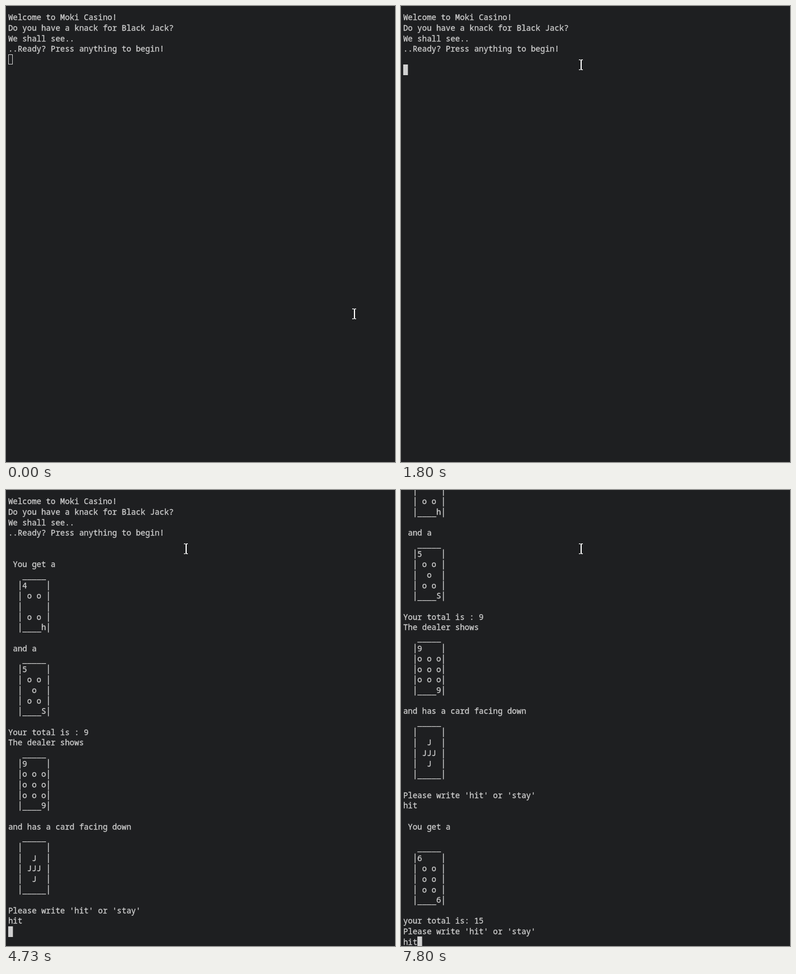
Recreate the animation shown at these times as an HTML page with a canvas. Size 691 px wide and 811 px high, loop 8000 ms.

```html
<!DOCTYPE html>
<html>
<head>
<meta charset="utf-8">
<style>
html, body { margin: 0; height: 100%; overflow: hidden; background: #1e1f21; }
canvas { display: block; }
</style>
</head>
<body>
<canvas id="stage" width="691" height="811"></canvas>
<script>
const ctx = document.getElementById('stage').getContext('2d');
const LOOP = 8000, LEFT = 3.9, TOP = 11, CHAR = 8.4, LINE = 18.65;
const ASK = "Please write 'hit' or 'stay'";

const card = (...rows) => ['   _____', ...rows.map(r => `  |${r}|`)];

const intro = [
  'Welcome to Moki Casino!',
  'Do you have a knack for Black Jack?',
  'We shall see..',
  '..Ready? Press anything to begin!'
];
const deal = [
  '', '', ' You get a',
  ...card('4    ', ' o o ', '     ', ' o o ', '____h'),
  '', ' and a',
  ...card('5    ', ' o o ', '  o  ', ' o o ', '____S'),
  '', 'Your total is : 9', 'The dealer shows',
  ...card('9    ', 'o o o', 'o o o', 'o o o', '____9'),
  '', 'and has a card facing down',
  ...card('     ', '  J  ', ' JJJ ', '  J  ', '_____'),
  '', ASK
];
const draw6 = [
  '', ' You get a', '',
  ...card('6    ', ' o o ', ' o o ', ' o o ', '____6'),
  '', 'your total is: 15', ASK
];

const typed = (t, ...times) => 'hit'.slice(0, times.filter(at => t >= at).length);

// The last line is the one holding the cursor.
function terminalLines(t) {
  if (t < 1800) return [...intro, ''];
  if (t < 1870) return [...intro, '', ''];
  const lines = [...intro, ...deal, typed(t, 4130, 4470, 4600)];
  if (t < 4730) return lines;
  if (t < 4800) return [...lines, ''];
  return [...lines, ...draw6, typed(t, 7270, 7600, 7800)];
}

function mousePosition(t) {
  if (t >= 1070) return [320, 105];
  if (t >= 930) return [320, 101];
  const step = Math.min(13, Math.floor(t / 66.5));
  if (step <= 10) {
    const p = (step / 10) ** 1.5;
    return [619 - 177 * p, 548 - 308 * p];
  }
  const q = (step - 10) / 3, p = q * (1.3 - 0.3 * q);
  return [442 - 107 * p, 240 - 123 * p];
}

// Card borders are ruled as lines; everything else is set as text.
function drawLine(text, top) {
  const baseline = Math.round(top + 14.45), y = Math.round(top);
  const letters = text.replace(/[|_]/g, ' ');
  ctx.fillText(letters, LEFT, baseline);
  ctx.lineWidth = 0.3;
  ctx.strokeText(letters, LEFT, baseline);
  [...text].forEach((c, i) => {
    const x = LEFT + i * CHAR;
    if (c === '|') ctx.fillRect(x + CHAR / 2 - 0.6, y + 1.5, 1.4, 17);
    if (c === '_') ctx.fillRect(x, y + 17, CHAR, 1.2);
  });
}

function drawMouse(t) {
  const [x, y] = mousePosition(t).map(Math.round);
  ctx.fillStyle = '#fff';
  ctx.fillRect(x - 1, y - 9, 2, 17);
  for (const serif of [y - 10, y + 7.7]) {
    ctx.fillRect(x - 4, serif, 3, 1.3);
    ctx.fillRect(x, serif, 3, 1.3);
  }
}

function render() {
  const t = performance.now() % LOOP;
  ctx.fillStyle = '#1e1f21';
  ctx.fillRect(0, 0, 691, 811);
  ctx.font = '14px "Noto Sans Mono", monospace';
  ctx.fillStyle = ctx.strokeStyle = '#d0d0d0';

  const lines = terminalLines(t);
  const last = lines.length - 1;
  const scroll = Math.max(0, last - 42);
  const rowTop = i => TOP + (i - scroll) * LINE;
  lines.forEach((text, i) => drawLine(text, rowTop(i)));

  const x = LEFT + lines[last].length * CHAR, y = Math.round(rowTop(last));
  ctx.lineWidth = 1;
  if (t < 1200) ctx.strokeRect(Math.round(x) + 0.5, y + 0.5, 7, 17);
  else ctx.fillRect(x, y, CHAR, 19);

  drawMouse(t);
  requestAnimationFrame(render);
}
render();
</script>
</body>
</html>
```
